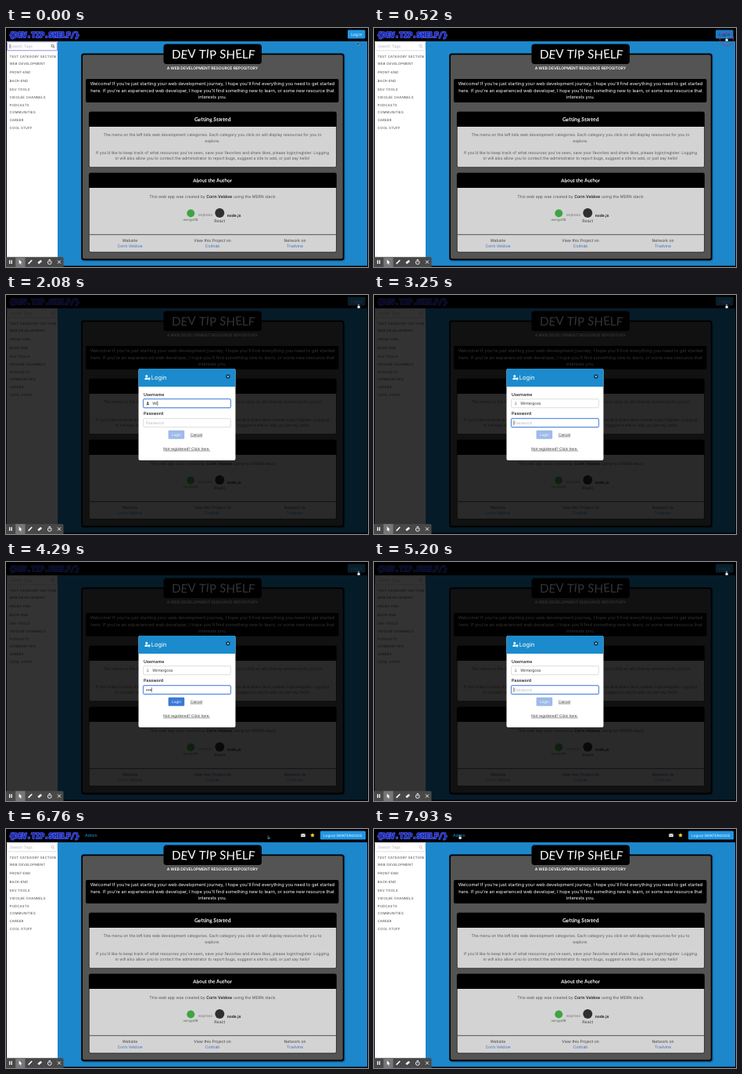
Recreate the animation shown at these times as an HTML page with a canvas. Size 463x305 px, loop 8 s.

```html
<!DOCTYPE html>
<html lang="en">
<head>
<meta charset="utf-8">
<title>Login demo</title>
<style>
  html, body { margin: 0; width: 100%; height: 100%; overflow: hidden; background: #000; }
  canvas { display: block; width: 463px; height: 305px; }
</style>
</head>
<body>
<canvas id="stage" width="463" height="305"></canvas>
<script>
const c = document.getElementById('stage').getContext('2d');
const LOOP = 8000, STEP = 130;
const SANS = 'Inter, "Open Sans", sans-serif';
const HAND = 'Lato, "Open Sans", sans-serif';
const BLUE = '#1d87cb', LINK = '#3b6fc4';
const USER = 'Wintergoss', AUTHOR = 'Corin Veldow';

// [time, value] keys
const TYPED = [[0, 0], [1560, 1], [2080, 2], [2340, 3], [2470, 5], [2600, 6], [2730, 7], [2860, 9], [3120, 10]];
const DOTS = [[0, 0], [3900, 1], [4030, 2], [4290, 3], [4420, 4], [4550, 5], [4680, 6], [4940, 7], [5200, 0]];
const PATH = [[0, 449.5, 20], [390, 451, 14], [5980, 451, 14], [6110, 449, 12], [6240, 449, 12],
  [7150, 250, 9], [7930, 110, 10], [8000, 110, 10]];

const MENU = [['TEST CATEGORY SECTION', 36], ['WEB DEVELOPMENT', 45.4], ['FRONT-END', 56.3], ['BACK-END', 67.2],
  ['DEV TOOLS', 78], ['VIDOLEE CHANNELS', 88.8], ['PODCASTS', 98.3], ['COMMUNITIES', 107.8],
  ['CAREER', 117.4], ['COOL STUFF', 127]];

const held = (keys, t) => keys.filter(k => k[0] <= t).pop()[1];
const between = (t, a, b) => t >= a && t < b;

function cursorAt(t) {
  const q = Math.floor(t / STEP) * STEP;
  const i = Math.max(1, PATH.findIndex(k => k[0] > q));
  const a = PATH[i - 1], b = PATH[i], k = (q - a[0]) / (b[0] - a[0]);
  return [a[1] + (b[1] - a[1]) * k, a[2] + (b[2] - a[2]) * k];
}

function box(x0, y0, x1, y1, fill, r = 0, stroke, width = 0.7) {
  c.beginPath();
  c.roundRect(x0, y0, x1 - x0, y1 - y0, r);
  if (fill) { c.fillStyle = fill; c.fill(); }
  if (stroke) { c.strokeStyle = stroke; c.lineWidth = width; c.stroke(); }
}

function line(color, width, ...p) {
  c.beginPath();
  for (let i = 0; i < p.length; i += 2) c.lineTo(p[i], p[i + 1]);
  c.strokeStyle = color;
  c.lineWidth = width;
  c.stroke();
}

function poly(fill, ...p) {
  c.beginPath();
  for (let i = 0; i < p.length; i += 2) c.lineTo(p[i], p[i + 1]);
  c.closePath();
  c.fillStyle = fill;
  c.fill();
}

function disc(x, y, r, fill) {
  c.beginPath();
  c.arc(x, y, r, 0, 7);
  c.fillStyle = fill;
  c.fill();
}

function ring(x, y, r, color, width) {
  c.beginPath();
  c.arc(x, y, r, 0, 7);
  c.strokeStyle = color;
  c.lineWidth = width;
  c.stroke();
}

// y is the middle of the capitals
function text(s, x, y, size, color, { align = 'left', weight = 400, font = SANS, gap = 0 } = {}) {
  c.font = `${weight} ${size}px ${font}`;
  c.letterSpacing = gap + 'px';
  c.textAlign = align;
  c.fillStyle = color;
  c.fillText(s, x, y + size * 0.36);
  return c.measureText(s).width;
}
const mid = (s, x, y, size, color, weight = 400) => text(s, x, y, size, color, { align: 'center', weight });

function underlined(s, x, y, size, color) {
  const w = text(s, x, y, size, color);
  line(color, 0.5, x, y + 2.7, x + w, y + 2.7);
}

// Loose lettering: each letter tilts and bobs a little
function scrawl(s, x, y, size, weight) {
  c.font = `${weight} ${size}px ${HAND}`;
  c.letterSpacing = '0px';
  let left = x - c.measureText(s).width / 2;
  [...s].forEach((ch, i) => {
    const w = c.measureText(ch).width;
    c.save();
    c.translate(left + w / 2, y + Math.sin(i * 2.3) * size * 0.04);
    c.rotate(Math.sin(i * 1.7) * 0.1);
    text(ch, 0, 0, size, '#fff', { align: 'center', weight, font: HAND });
    c.restore();
    left += w;
  });
}

function lens(x, y, color) {
  ring(x, y, 1.6, color, 0.8);
  line(color, 0.9, x + 1.2, y + 1.2, x + 2.8, y + 2.8);
}

function person(x, y, size, color) {
  disc(x, y - size * 0.5, size * 0.5, color);
  box(x - size * 0.8, y + size * 0.15, x + size * 0.8, y + size, color, [size * 0.6, size * 0.6, 0, 0]);
}

function star(x, y, r, fill) {
  const p = [];
  for (let i = 0; i < 10; i++) {
    const a = i * Math.PI / 5 - Math.PI / 2, q = i % 2 ? r * 0.48 : r;
    p.push(x + q * Math.cos(a), y + q * Math.sin(a));
  }
  poly(fill, ...p);
}

function topBar(loggedIn, pressed) {
  box(0, 0, 463, 17, '#000');
  const logo = '{DEV.TIP.SHELF/}';
  c.font = '700 9.3px "DejaVu Sans Mono", monospace';
  c.letterSpacing = '0px';
  c.textAlign = 'left';
  c.lineJoin = 'round';
  c.lineWidth = 1.8;
  c.strokeStyle = '#4656f0';
  c.strokeText(logo, 4.2, 11.6);
  c.fillStyle = '#1c2492';
  c.fillText(logo, 4.2, 11.6);
  if (loggedIn) {
    text('Admin', 101, 8, 5.2, '#2b98e6');
    box(377.3, 6, 382.7, 10, '#fff', 0.6);
    line('#000', 0.6, 377.5, 6.6, 380, 8.5, 382.5, 6.6);
    star(392, 8, 3, '#f4d321');
    box(402, 2.5, 460, 13.5, '#2196e3', 1.2);
    mid(`Logout (${USER.toUpperCase()})`, 431, 8, 4.5, '#fff');
  } else {
    box(437, 2.5, 459.5, 13.5, pressed ? '#1a7bcb' : '#2196e3', 1.2);
    mid('Log in', 448.3, 8, 4.9, pressed ? '#12264a' : '#fff');
  }
}

function sidebar(focused) {
  box(0, 17, 66, 305, '#fff');
  box(1.5, 17.8, 65.4, 28.8, '#fff', 1, focused ? '#9a8fe0' : '#d3d3d8', focused ? 1.1 : 0.7);
  text('Search Tags', 5, 23.4, 4.9, '#b4b4bb');
  if (focused) line('#222', 0.6, 5, 20.5, 5, 26.3);
  lens(59.5, 22.8, focused ? '#555' : '#bbb');
  for (const [label, y] of MENU) text(label, 4.6, y, 4.3, '#454545', { gap: 0.2 });
}

function card(y0, y1, head, title, size) {
  box(106.3, y0, 422.5, y1, '#d3d3d3', 2, '#000', 0.6);
  box(106, y0, 422.8, head, '#000', [2, 2, 0, 0]);
  scrawl(title, 264, (y0 + head) / 2, size, 700);
}

function author() {
  const size = 5.16;
  const parts = [['This web app was created by ', 400], [AUTHOR, 600], [' using the MERN stack.', 400]];
  const width = parts.reduce((sum, [s, w]) => {
    c.font = `${w} ${size}px ${SANS}`;
    return sum + c.measureText(s).width;
  }, 0);
  let x = 264.5 - width / 2;
  for (const [s, w] of parts) x += text(s, x, 215, size, w > 400 ? '#222' : '#555', { weight: w });
}

function panel() {
  c.save();
  c.shadowColor = 'rgba(0,0,0,.6)';
  c.shadowBlur = 2;
  c.shadowOffsetX = c.shadowOffsetY = 0.7;
  box(96.3, 32.6, 432.3, 296.2, '#000', 3);
  c.restore();
  box(98, 34.3, 430.8, 294.6, '#545454', 2);
}

function content() {
  box(66, 17, 463, 305, BLUE);
  panel();
  box(201.5, 20.5, 327, 46, '#000', 4);
  scrawl('DEV TIP SHELF', 264.5, 33.3, 15.3, 400);
  mid('A WEB DEVELOPMENT RESOURCE REPOSITORY', 264, 51.6, 5, '#fff', 600);

  box(102, 65, 425.5, 95, '#000', 2);
  ["Welcome! If you're just starting your web development journey, I hope you'll find everything you need to get started",
    "here. If you're an experienced web developer, I hope you'll find something new to learn, or some new resource that",
    'interests you.'].forEach((s, i) => mid(s, 264, 71.3 + i * 8.3, 5.74, '#fff'));

  card(107, 177.7, 126, 'Getting Started', 6.8);
  const copy = (s, y) => mid(s, 264, y, 5.14, '#5a5a5a');
  copy('The menu on the left lists web development categories. Each category you click on will display resources for you to', 136.6);
  copy('explore.', 144);
  copy("If you'd like to keep track of what resources you've seen, save your favorites and share likes, please login/register. Logging", 159);
  copy('in will also allow you to contact the administrator to report bugs, suggest a site to add, or just say hello!', 166.4);

  card(185, 286, 204, 'About the Author', 6.3);
  author();
  disc(236.3, 236.5, 5, '#3fa344');
  mid('mongoDB', 236, 245, 4.1, '#3f6b42');
  mid('express', 255, 238, 4.8, '#777');
  disc(273.3, 236, 6, '#2f2f2f');
  mid('React', 273.3, 246, 5.2, '#444');
  mid('node.js', 291.5, 239, 4.9, '#222', 700);

  line('#333', 0.8, 106.5, 263.7, 422.3, 263.7);
  [['Website', AUTHOR, 158.5], ['View this Project on', 'Codnab', 264], ['Network on', 'Tradvine', 369.5]]
    .forEach(([a, b, x]) => {
      mid(a, x, 271, 5.1, '#444');
      mid(b, x, 278.5, 5.1, LINK);
    });
}

function field(y0, y1, focused) {
  if (focused) box(175.7, y0, 287.3, y1, null, 1.2, '#b9d2f5', 2);
  box(175.7, y0, 287.3, y1, '#fff', 1.2, focused ? '#4f86dc' : '#d0d0d4', focused ? 1 : 0.7);
}

function modal(t) {
  const onUser = t < 3120, typed = held(TYPED, t), dots = held(DOTS, t);
  box(169.5, 94, 293.5, 211, '#fff', 2);
  box(169.5, 94, 293.5, 117, '#1b8bcd', [2, 2, 0, 0]);
  person(179.8, 105, 3, '#fff');
  box(181.3, 105.2, 184.6, 108.4, '#fff', 0.4, '#1b8bcd', 0.5);
  text('Login', 185.7, 105, 7.6, '#fff');
  disc(284, 104, 2.7, '#143c58');
  line('#fff', 0.6, 283, 103, 285, 105);
  line('#fff', 0.6, 285, 103, 283, 105);

  text('Username', 176, 126.6, 5.3, '#222', { weight: 600 });
  field(132.8, 143.8, onUser);
  person(181.3, 138.3, 2, onUser ? '#444' : '#bbb');
  const name = USER.slice(0, typed);
  const w = text(name || 'Username', 187.3, 138.4, 4.9, name ? '#333' : '#b5b5ba');
  const blink = between(t, 1170, 1560) || between(t, 1690, 1820);
  if (onUser && !blink) {
    const x = 187.4 + (name ? w + 0.4 : 0);
    line('#222', 0.6, x, 135.3, x, 141.3);
  }

  text('Password', 176, 151.4, 5.3, '#222', { weight: 600 });
  field(157.7, 168.6, !onUser);
  if (!dots) text('Password', 179, 163.2, 4.9, '#b5b5ba');
  for (let i = 0; i < dots; i++) disc(180.3 + i * 2.4, 163.3, 0.85, '#333');
  if (!onUser) {
    const x = 178.9 + dots * 2.45;
    line('#222', 0.6, x, 160.2, x, 166.2);
  }

  box(207.6, 172.7, 228.2, 183.8, dots ? '#3b78d8' : '#9dbae9', 1.2);
  mid('Login', 218, 178.2, 4.6, '#fff');
  underlined('Cancel', 235.7, 178.2, 4.75, '#333');
  underlined('Not registered? Click here.', 201.3, 196.2, 4.75, '#333');
}

function toolbar() {
  box(0, 292.3, 73.5, 305, '#484848', [0, 1.5, 0, 0]);
  box(12.2, 292.3, 24.5, 305, '#777');
  const y = 298.6, w = '#fff';
  box(4, y - 2.3, 5.3, y + 2.3, w);
  box(6.5, y - 2.3, 7.8, y + 2.3, w);
  poly(w, 16.6, y - 3, 20.6, y + 0.8, 18.8, y + 1, 19.7, y + 2.8, 18.7, y + 3.2, 17.9, y + 1.4, 16.6, y + 2.4);
  line(w, 1.6, 28.6, y + 2.3, 33.2, y - 2.3);
  line(w, 2.6, 41.2, y + 1.6, 45.2, y - 1.6);
  ring(55.8, y + 0.5, 2.4, w, 0.9);
  line(w, 0.9, 54.8, y - 3, 56.8, y - 3);
  line(w, 0.7, 55.8, y + 0.5, 55.8, y - 1.1);
  line(w, 0.9, 66, y - 2, 70, y + 2);
  line(w, 0.9, 70, y - 2, 66, y + 2);
}

// Thin black rim left, right and below
function rim() {
  box(0, 0, 1, 305, '#000');
  box(462, 0, 463, 305, '#000');
  box(0, 303.5, 463, 305, '#000');
}

function pointer(x, y, hand) {
  if (hand) {
    box(x - 0.7, y - 2.4, x + 0.6, y + 1, '#fff', 0.6, '#222', 0.5);
    box(x - 1.7, y - 0.2, x + 2, y + 2.9, '#fff', 1, '#222', 0.5);
  } else {
    poly('#9cc9e6', x - 0.5, y - 2, x + 2.7, y + 1.5, x - 0.5, y + 2.6);
    poly('#111', x, y - 1.6, x + 2.2, y + 1.1, x + 1, y + 1.3, x, y + 2.2);
  }
}

function draw(t) {
  const open = between(t, 650, 5720), pressed = between(t, 520, 650);
  c.textRendering = 'geometricPrecision';
  content();
  sidebar(t < 520);
  topBar(t >= 5850, pressed);
  if (open) {
    box(0, 0, 463, 305, 'rgba(0,0,0,.8)');
    modal(t);
  }
  rim();
  toolbar();
  const [x, y] = cursorAt(t);
  if (pressed) ring(x, y, 8.7, 'rgba(190,50,90,.75)', 1);
  pointer(x, y, between(t, 260, 6240) || t >= 7800);
}

function tick() {
  draw(performance.now() % LOOP);
  requestAnimationFrame(tick);
}
tick();
</script>
</body>
</html>
```
